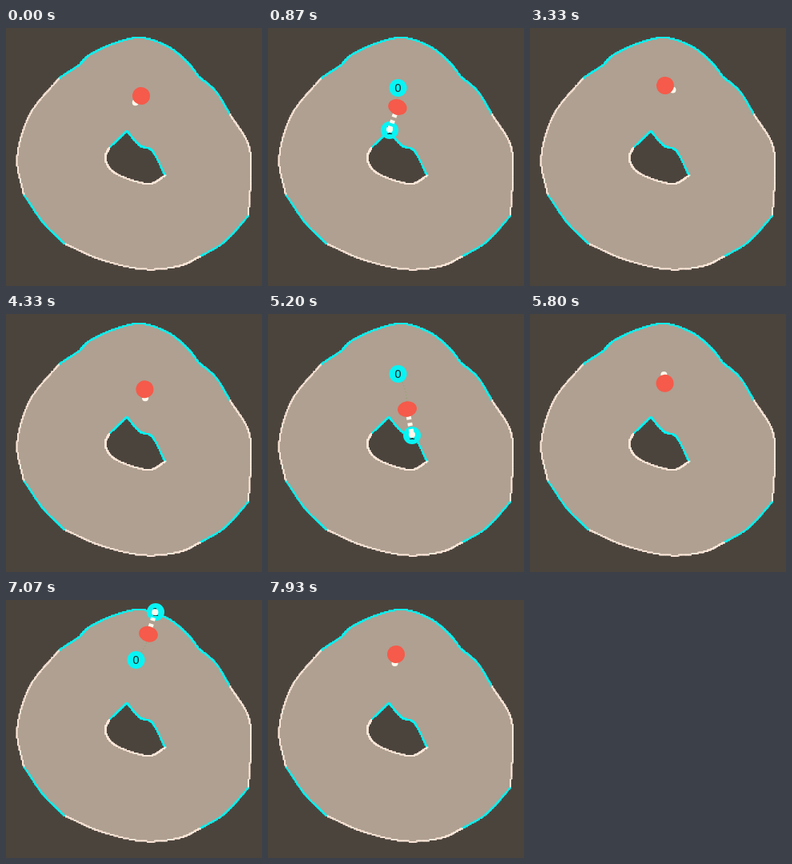
Recreate the animation shown at these times as an HTML page with a canvas. Size 320 by 323 pixels, loop 8000 ms.

```html
<!DOCTYPE html>
<html lang="en">
<head>
<meta charset="utf-8">
<title>Probe in a ring</title>
<style>
  html, body { margin: 0; width: 100%; height: 100%; overflow: hidden; background: #4b443d; }
  canvas { display: block; width: 320px; height: 323px; }
</style>
</head>
<body>
<canvas id="stage" width="320" height="323"></canvas>
<script>
const W = 320, H = 323, LOOP = 8000, FPS = 15;
const BG = '#4b443d', TAN = '#afa091', RIM = '#ffeadc', CYAN = '#08f4f4', RED = '#f55a4a', WHITE = '#fff8ec';
const GRID = 1.5, LEAD = 11, HOLD = 400;
const ctx = document.getElementById('stage').getContext('2d');

// Each run of the rim is a smooth curve; corners lie only where runs meet.
const outer = [
  { color: CYAN, points: [[66, 63], [92, 46]] },
  { color: CYAN, points: [[92, 46], [104, 34], [133, 20], [168, 12], [202, 23], [226, 42], [241, 61]] },
  { color: CYAN, points: [[241, 61], [262, 79], [280, 108]] },
  { color: RIM, points: [[280, 108], [303, 146], [306, 185], [303, 235]] },
  { color: CYAN, points: [[303, 235], [274, 267], [243, 286]] },
  { color: RIM, points: [[243, 286], [216, 298], [172, 302], [119, 290], [73, 270]] },
  { color: CYAN, points: [[73, 270], [46, 243], [22, 208]] },
  { color: RIM, points: [[22, 208], [14, 162], [30, 108], [66, 63]] }
];
const inner = [
  { color: CYAN, points: [[129, 150], [151, 129]] },
  { color: CYAN, points: [[151, 129], [167, 147], [183, 154], [199, 185]] },
  { color: RIM, points: [[199, 185], [177, 195], [137, 182], [124, 164], [129, 150]] }
];

// Ball path: time, x, y
const path = [
  [-400, 178, 80], [0, 169, 85], [867, 162, 99], [1333, 157, 87], [1800, 164, 77],
  [2300, 168, 68], [2850, 163, 69], [3333, 169, 72], [3800, 172, 75], [5200, 174, 119],
  [5950, 168, 78], [6400, 174, 62], [6933, 181, 42], [7500, 162, 55], [7933, 160, 68],
  [8400, 158, 82]
];
const home = [162.5, 75];
const hits = [
  { at: 867, x: 152, y: 128 },
  { at: 5200, x: 180, y: 152 },
  { at: 6933, x: 187, y: 15 }
];

const clamp = v => Math.max(0, Math.min(1, v));
const ease = v => v * v * (3 - 2 * v);
const mix = (a, b, k) => a + (b - a) * k;

function hermite(p, q, mp, mq, u) {
  const v = 1 - u;
  return p * v * v * (1 + 2 * u) + q * ease(u) + u * v * (v * mp - u * mq);
}

// Value of column c between rows i and i + 1; rows are placed at when(row, index).
function curve(rows, i, u, c, when) {
  const slope = k => {
    const a = Math.max(k - 1, 0), b = Math.min(k + 1, rows.length - 1);
    return (rows[b][c] - rows[a][c]) / (when(b) - when(a));
  };
  const span = when(i + 1) - when(i);
  return hermite(rows[i][c], rows[i + 1][c], slope(i) * span, slope(i + 1) * span, u);
}

function ballAt(t) {
  const when = k => path[k][0];
  let i = 0;
  while (i < path.length - 2 && when(i + 1) <= t) i++;
  const u = (t - when(i)) / (when(i + 1) - when(i));
  return [1, 2].map(c => curve(path, i, u, c, when));
}

function sample({ points }) {
  const out = [], steps = 100;
  for (let i = 0; i < points.length - 1; i++)
    for (let s = 0; s < steps; s++)
      out.push([0, 1].map(c => curve(points, i, s / steps, c, k => k)));
  return out;
}

function buildRing() {
  const layer = document.createElement('canvas');
  layer.width = W;
  layer.height = H;
  const g = layer.getContext('2d');
  const snap = v => Math.round(v / GRID) * GRID;
  g.fillStyle = BG;
  g.fillRect(0, 0, W, H);
  [[outer, TAN], [inner, BG]].forEach(([runs, color]) => {
    g.fillStyle = color;
    g.beginPath();
    runs.flatMap(sample).forEach(p => g.lineTo(...p));
    g.fill();
    runs.forEach(run => {
      g.fillStyle = run.color;
      sample(run).forEach(([x, y]) =>
        g.fillRect(snap(x) - GRID / 2, snap(y) - GRID / 2, GRID, GRID));
    });
  });
  return layer;
}

function dot(x, y, r, color) {
  ctx.fillStyle = color;
  ctx.beginPath();
  ctx.arc(x, y, r, 0, Math.PI * 2);
  ctx.fill();
}

function node(x, y, label, scale) {
  ctx.save();
  ctx.translate(x, y);
  ctx.scale(scale, scale);
  dot(0, 0, 11, CYAN);
  ctx.fillStyle = '#17302f';
  ctx.fillText(label, 0, 5);
  ctx.restore();
}

function dashes(width, dash, color, trace) {
  ctx.strokeStyle = color;
  ctx.lineWidth = width;
  ctx.setLineDash(dash);
  ctx.beginPath();
  trace();
  ctx.stroke();
  ctx.setLineDash([]);
}

function draw(t) {
  ctx.drawImage(ring, 0, 0);
  const [x, y] = ballAt(t);
  const [x0, y0] = ballAt(t - 30), [x1, y1] = ballAt(t + 30);
  const heading = Math.atan2(y1 - y0, x1 - x0);
  let bx = x + LEAD * Math.cos(heading), by = y + LEAD * Math.sin(heading);

  // Near a hit the bead leaves the ball, sticks to the wall and comes back.
  const hit = hits.find(h => Math.abs(t - h.at) < HOLD);
  if (hit) {
    const left = HOLD - Math.abs(t - hit.at);
    const grow = clamp(left / 200), reach = ease(clamp(left / 300));
    const scale = grow * (1.6 - 0.6 * grow);
    bx = mix(bx, hit.x, reach);
    by = mix(by, hit.y - 1, reach);
    dashes(1, [1, 3], '#7fa75c', () => {
      ctx.moveTo(...home);
      ctx.quadraticCurveTo(x, (home[1] + y) / 2 - 4, x, y);
    });
    node(...home, '0', scale);
    node(hit.x, hit.y, '1', scale);
  }

  const dist = Math.hypot(bx - x, by - y), angle = Math.atan2(by - y, bx - x);
  if (dist > 16) {
    dashes(6, [4, 4], WHITE, () => {
      ctx.moveTo(x + 9.5 * Math.cos(angle), y + 9.5 * Math.sin(angle));
      ctx.lineTo(bx, by);
    });
  }
  dot(bx, by, 4, WHITE);

  const squash = clamp((dist - 12) / 15);
  ctx.fillStyle = RED;
  ctx.beginPath();
  ctx.ellipse(x, y, 11 - 1.3 * squash, 11 + squash, angle, 0, Math.PI * 2);
  ctx.fill();
}

const ring = buildRing();
ctx.textAlign = 'center';
ctx.font = '14px "DejaVu Sans", sans-serif';

function tick() {
  const t = performance.now() % LOOP;
  draw(Math.floor(t * FPS / 1000 + 0.05) * 1000 / FPS);
  requestAnimationFrame(tick);
}
tick();
</script>
</body>
</html>
```
